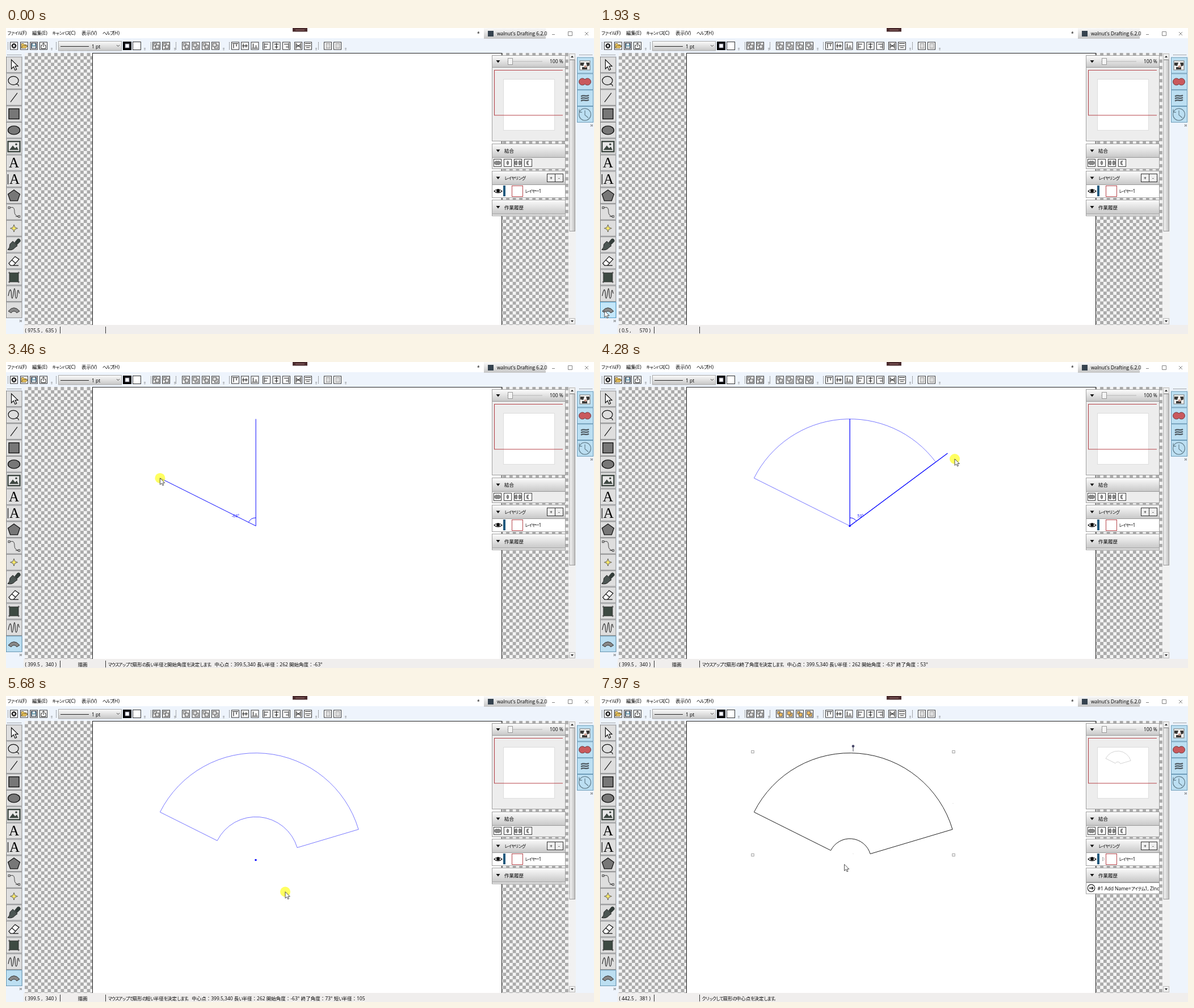
Animation of 1036 by 540 pixels, one loop 8000 ms. Source, as an HTML page:

```html
<!DOCTYPE html>
<html lang="ja">
<head>
<meta charset="utf-8">
<title>Fan tool</title>
<style>
html, body { margin: 0; width: 100%; height: 100%; overflow: hidden; background: #fff; }
svg { display: block; }
text { font-family: "Open Sans", "Noto Sans", "Noto Sans CJK JP", "Noto Sans CJK", sans-serif; font-size: 8.5px; white-space: pre; }
.kana { font-size: 7.6px; letter-spacing: -1.4px; }
.serif { font-family: "Liberation Serif", "Noto Serif", serif; font-size: 25px; }
</style>
</head>
<body>
<svg id="stage" width="1036" height="540" viewBox="0 0 1036 540"></svg>
<script>
const LOOP = 8000;
const UNIT = 0.7214;               // screen pixels per canvas unit
const C = { x: 440.2, y: 289.3 };  // centre of the fan
const R = 188.7, A0 = -63.43, A1 = 73.4;

// ---- drawing helpers ----
const rect = (x, y, w, h, fill, stroke = 'none', more = '') =>
  `<rect x="${x}" y="${y}" width="${w}" height="${h}" fill="${fill}" stroke="${stroke}" ${more}/>`;
const path = (d, stroke = '#222', w = 1, fill = 'none', more = '') =>
  `<path d="${d}" stroke="${stroke}" stroke-width="${w}" fill="${fill}" ${more}/>`;
const oval = (x, y, rx, ry, fill, stroke = 'none', w = 1, more = '') =>
  `<ellipse cx="${x}" cy="${y}" rx="${rx}" ry="${ry}" fill="${fill}" stroke="${stroke}" stroke-width="${w}" ${more}/>`;
const at = (x, y, inner) => `<g transform="translate(${x} ${y})">${inner}</g>`;
const text = (x, y, s, more = '') => `<text x="${x}" y="${y}" ${more}>` +
  s.replace(/[\u3001-\u30ff]+/g, k => `<tspan class="kana">${k}</tspan>`) + '</text>';
const dots = (x, y, n, dx, dy) => Array.from({ length: n }, (_, i) =>
  rect(x + i * dx, y + i * dy, 1, 1, '#555')).join('');
const polar = (r, a) => {
  const k = a * Math.PI / 180;
  return [C.x + r * Math.sin(k), C.y - r * Math.cos(k)];
};
const pt = p => p.map(v => v.toFixed(2)).join(' ');
const arc = (r, to, sweep) => `A${r} ${r} 0 0 ${sweep} ${pt(to)}`;

// Ring sector between two angles; r = 0 gives a pie slice.
function fan(r, a) {
  const sweep = a > A0 ? 1 : 0;
  const inner = r > 0 ? `L${pt(polar(r, a))}${arc(r, polar(r, A0), 1 - sweep)}` : `L${C.x} ${C.y}`;
  return `M${pt(polar(R, A0))}${arc(R, polar(R, a), sweep)}${inner}Z`;
}

// ---- static parts ----
const defs = `<defs>
  <linearGradient id="head" x2="0" y2="1"><stop stop-color="#fbfbfb"/><stop offset="1" stop-color="#c6c6c6"/></linearGradient>
  <linearGradient id="bar"><stop stop-color="#fafafa"/><stop offset="1" stop-color="#bdbdbd"/></linearGradient>
  <pattern id="check" width="11.54" height="11.54" x="33" y="44" patternUnits="userSpaceOnUse">
    <rect width="11.54" height="11.54" fill="#aaa"/>
    <path d="M0 0h5.77v11.54h5.77v-5.77h-11.54z" fill="#f4f4f4"/></pattern></defs>`;

const toolIcons = [
  path('M-4.500-9V7L-.7 3.300 2 9.500 4.700 8.300 2 2.300H7Z', '#111', 1.2, '#fff'),
  oval(-1, -1, 9, 7.5, 'none', '#111', 1.2) + path('M3 5Q9 5 8 9', '#111', 1.2),
  path('M-6 8L6-8', '#111', 1.1),
  rect(-9, -9, 18, 18, '#777', '#111', 'stroke-width="1.4"'),
  oval(0, 0, 10.5, 7.5, '#777', '#111', 1.4),
  rect(-10.5, -9, 21, 18, '#e8e8e8', '#3c4640', 'stroke-width="2.4"') +
    path('M-8 6L-2-2 2 3 5 0 8 6Z', 'none', 0, '#3c4640') + oval(4, -4, 1.8, 1.8, '#3c4640'),
  '<text class="serif" text-anchor="middle" y="8">A</text>',
  path('M-10.500-9V9', '#111', 1.2) + '<text class="serif" text-anchor="middle" x="1" y="8">A</text>',
  path('M0-10L10.500-2.500 6.500 9H-6.500L-10.500-2.500Z', '#111', 1.2, '#777'),
  path('M-9-8H-2Q1-7 1 0T9 8H3', '#333', .9) + rect(-10, -9, 3, 3, '#fff', '#333') + rect(7.5, 6.5, 3, 3, '#fff', '#333'),
  path('M0-6.500L1.700-1.700 6.500 0 1.700 1.700 0 6.500-1.700 1.700-6.500 0-1.700-1.700Z', '#555', .9, '#ffec6a'),
  path('M1-4L6-10Q9-12 11-9T10-4L5 1Z', 'none', 0, '#333d3a') + path('M-2-6L6 2 2 5Q-3 11-11 9-7 6-7-1Z', '#222', 1, '#4c5653'),
  path('M-9 4L2-8 9-3-1 8H-6ZM-4-2L3 4M-6 8H8', '#111', 1.2, '#fff'),
  rect(-8, -8, 16, 16, '#3d4a42') + path('M-10-8H10M-10 8H10M-8-10V10M8-10V10', '#222', .8),
  path('M-10 4C-8-7-6-10-5-4S-5 8-3 8-1-9 1-9 1 8 4 8 5-5 7-6 8 0 10-1', '#222', 1.1),
  path('M-10 2Q0-10 10 2L5 5Q0-1-5 5Z', '#333', 1, '#888')
];
const toolY = i => 65 + i * 28.85;
const tool = (i, fill = '#dedede', edge = '#8a8a8a') =>
  rect(.5, toolY(i) - 13.9, 27.5, 27.5, fill, edge) + at(14, toolY(i), toolIcons[i]);

const cell = (x, inner = '') => at(x, 31.5, rect(-6.5, -6.5, 13, 13, '#fff', '#333') + inner);
const stack = c => rect(-4.5, -4.5, 5, 5, c, '#666') + rect(-1.5, -1.5, 6, 6, c, '#444');
const arrange = c => [317, 334.5, 352, 369].map((x, i) =>
  cell(x, i % 2 ? rect(-1.5, -1.5, 6, 6, c, '#555') + rect(-4.5, -4.5, 6, 6, c, '#555') : stack(c))).join('');
const more = x => path(`M${x} 36h3M${x + .5} 38l1 1 1-1`, '#555', .8);

function topBar() {
  const aligns = ['M-5-4H5M-3-3V4M2-3V1', 'M-5 0H5M-3-4V4M2-3V3', 'M-5 4H5M-3 3V-4M2 3V-1',
    'M-4-5V5M-3-3H3M-3 2H1', 'M0-5V5M-4-3H4M-3 2H3', 'M4-5V5M3-3H-4M3 2H-1',
    'M-4-5V5M4-5V5M-3-2L3 2M-3 2L3-2', 'M-5-4H5M-5 0H5M-3 3H3'];
  let s = rect(0, 18, 1036, 26, '#eef4fc') + rect(842, 0, 109, 19, 'url(#head)');
  s += ['ファイル(F)', '編集(E)', 'キャンバス(C)', '表示(V)', 'ヘルプ(H)']
    .map((m, i) => text([2, 46, 81, 133, 170][i], 11.5, m)).join('');
  s += text(865, 13, "walnut's Drafting 6.2.0") + rect(849, 5, 10, 10, '#36434f') + text(830, 13, '*');
  s += rect(505, 0, 26, 6.5, '#4a2b2d') + path('M510 3.500H526', '#a07474', 1);
  s += path('M962 11.500H967M990.500 6.500H997.500V13.500H990.500ZM1020 7L1026 13M1026 7L1020 13', '#777', .9);
  s += [3, 88, 255, 299, 393, 550].map(x => dots(x, 25, 7, 0, 2)).join('');
  s += [79, 243, 296, 382, 545, 597].map(more).join('');
  s += cell(14, oval(0, 0, 3.2, 3.2, 'none', '#222', 2) + path('M-5 0H5M0-5V5M-3.500-3.500L3.500 3.500M3.500-3.500L-3.500 3.500', '#222', .9) + oval(0, 0, 1.5, 1.5, '#fff'));
  s += cell(32, path('M-5 4V-4H-1L0-2H4V0M-5 4L-3 0H6L3 4Z', '#5b4a20', .8, '#f0ca62'));
  s += cell(49, rect(-4.5, -4.5, 9, 9, '#6b98ab', '#223') + rect(-2, -4, 4, 3, '#fff') + rect(-3, 1, 6, 3, '#e8e8e8'));
  s += cell(66, path('M-2-1H-4V5H4V-1H2M0 2V-5M-2.500-2.500L0-5 2.500-2.500'));
  s += rect(92.5, 23.5, 111, 16.5, 'url(#head)', '#aaa') + path('M96 32.500H146', '#222', 1) + text(151, 35.500, '1 pt') +
    path('M195 30l2.500 2.500 2.500-2.500', '#444');
  s += rect(206, 24, 15, 15, '#000') + rect(210, 28, 7, 7, '#fff', '#778') + rect(223.5, 24.5, 14, 14, '#fff', '#333');
  s += [265, 282].map(x => cell(x, stack('#ddd') + path('M-5-5H5V5H-5Z', '#777', .8, 'none', 'stroke-dasharray="2 1"'))).join('');
  s += [404, 421, 438.5, 459, 476.5, 494, 515, 532].map((x, i) => cell(x, path(aligns[i], '#222', 1.2))).join('');
  s += [567, 584].map(x => cell(x, rect(-3, -4, 7, 8, '#ddd', '#999'))).join('');
  return s;
}

function sideBar() {
  const icons = [
    rect(-9, -8, 18, 16, '#f6f6f4', '#777') + path('M-8-5H-1L-3 1-8 0ZM2-5H8V0L4 2ZM-5 3H4V7H-5Z', 'none', 0, '#393836') + oval(1, 2, 2.5, 2, '#c99a8c'),
    path('M0-4A6 6 0 1 0 0 4A6 6 0 1 0 0-4Z', '#713a3f', 1, '#c9595d'),
    [-4, 0, 4].map(y => path(`M-7 ${y + 1}Q-4 ${y - .8} 0 ${y}T7 ${y - 1}`, '#4e5960', 2.2)).join(''),
    oval(0, 0, 10.5, 10.5, 'none', '#65808f', 1.2) + path('M0-7V1L6 6M-10-4V-9M-10-4H-5', '#65808f', 1.2)
  ];
  return rect(1004, 44, 32, 480, '#eef4fc') + dots(1010, 47, 12, 2, 0) +
    icons.map((g, i) => rect(1006.5, 52 + i * 28.85, 28, 27.8, '#bcdff2', '#6d9cb8') + at(1020, 66 + i * 28.85, g)).join('') +
    path('M1030 170l1.500 2-1.500 2M1033 170V174', '#444', .8);
}

const panel = (y, h, head, label) => rect(856.5, y + .5, 129, h, '#ededed', '#a0a0a0') +
  rect(857, y + 1, 128, head, 'url(#head)') + path(`M857 ${y + head + .5}H985`, '#999') +
  path(`M863.500 ${y + head / 2 - 1.5}h7l-3.500 4.500z`, 'none', 0, '#111') + text(878, y + head / 2 + 4.2, label);

function panels() {
  const union = ['M0-3A3.500 3.500 0 1 0 0 3A3.500 3.500 0 1 0 0-3Z', 'M0-4Q4 0 0 4Q-4 0 0-4Z',
    'M-2-4A4 4 0 0 0-2 4Q0 0-2-4ZM2-4A4 4 0 0 1 2 4Q0 0 2-4Z', 'M1-4A4 4 0 0 0 1 4Q-2 0 1-4Z'];
  let s = panel(48, 151, 21, '') + path('M883 59H945', '#c4c4c4', 1.5) + rect(884.5, 53.5, 8, 11, '#f4f4f4', '#999') +
    text(958, 62, '100 %') + rect(876.5, 90.5, 90, 90, '#fff', '#ddd') +
    path('M981 74.500H860.500V154H981', '#b5444a', 1.1);
  s += panel(204, 44, 24, '結合') + union.map((d, i) =>
    at(866 + i * 18, 238, rect(-6.5, -6.5, 13, 13, '#fff', '#444') + path(d, '#666', .7, '#888'))).join('');
  s += panel(252, 47, 24, 'レイヤリング') + rect(857, 277, 128, 22, '#fff') + rect(953.5, 257.5, 14, 14, '#eee', '#333') +
    rect(967.5, 257.5, 14, 14, '#eee', '#333') + text(958, 267.5, '+') + text(973, 267.5, '-');
  s += path('M860 288Q867 281 874 288Q867 294 860 288Z', '#111', 1.1, '#fff') + oval(867, 287.5, 3, 3, '#111') +
    rect(876, 278, 4, 19, '#215a7e') + rect(891.5, 278.5, 19, 19, '#fff', '#b5444a') + text(914, 291, 'レイヤー1');
  return s + panel(303, 28, 25, '作業履歴');
}

function scene() {
  let s = defs + rect(0, 0, 1036, 540, '#fff') + topBar();
  s += rect(0, 44, 33, 496, '#eef4fc') + dots(2, 47, 13, 2, 0) + toolIcons.map((_, i) => tool(i)).join('') +
    path('M24 515l1.500 2-1.500 2M27 515V519', '#444', .8);
  s += rect(33, 44, 958, 480, 'url(#check)') + rect(152.5, 44.5, 721, 500, '#fff', '#222');
  s += rect(991, 44, 13, 480, '#f1f1f1') + rect(992.5, 45.5, 10, 10, '#eee', '#bbb') + rect(992.5, 512.5, 10, 10, '#eee', '#bbb') +
    rect(993, 56.5, 9.5, 302, 'url(#bar)', '#999') + path('M995 52L997.500 49 1000 52ZM995 516L997.500 519 1000 516Z', 'none', 0, '#222');
  s += rect(31, 524, 1005, 16, '#f0eeed') + path('M95.500 527V539M175.500 527V539', '#333');
  return s + sideBar() + '<g id="art"></g>' + panels() + '<g id="live"></g>';
}

// ---- motion ----
// bursts of change: start, end, number of steps
const bursts = [[0, 0, 1], [420, 490, 2], [690, 1450, 11], [1520, 2290, 11], [2360, 2910, 9], [3110, 3460, 6], [3660, 3660, 1],
  [3860, 4630, 12], [4780, 5540, 12], [5610, 6380, 12], [6450, 7220, 12], [7290, 7630, 5], [7830, 7970, 3]];

function tick(t) {
  const [from, to, n] = bursts.filter(b => b[0] <= t).pop();
  if (t >= to) return to;
  const d = (to - from) / (n - 1);
  return from + Math.floor((t - from) / d + 1e-6) * d;
}

// pointer: time, x, y
const trail = [[0, 930, 560], [419, 930, 560], [420, 929, 539], [490, 927, 537], [690, 918, 532], [1000, 640, 490],
  [1300, 152.4, 455.2], [1400, 50, 458], [1450, 24, 464], [1830, 8, 499], [2059, 8, 499], [2290, 176, 472], [2360, 188, 469],
  [2700, 400, 310], [2840, C.x, C.y], [3040, C.x, C.y], [3390, 271.4, 204.9], [3800, 271.4, 204.9], [3990, 380, 163],
  [4100, 512, 148], [4210, 612.5, 161], [4280, 625, 171], [4420, 642, 190], [4560, 655.8, 225], [4780, 655.8, 225],
  [4990, 640, 243], [5200, 590, 275], [5330, 545, 302], [5470, 510, 338], [5610, 494, 343], [5680, 492, 345.5],
  [6000, 480, 352], [6310, 484, 342], [6660, 459.6, 313], [6730, 459.3, 315], [7000, 464.2, 318], [7290, 465, 319],
  [7450, 475, 322], [7630, 489, 335], [7830, 486, 330], [7900, 471.2, 318.9], [7970, 430.5, 297]];

function pointer(time) {
  const t = Math.max(0, time);
  const i = trail.findIndex(k => k[0] > t);
  if (i < 0) return trail[trail.length - 1].slice(1);
  const a = trail[i - 1], b = trail[i], f = (t - a[0]) / (b[0] - a[0]);
  return [a[1] + (b[1] - a[1]) * f, a[2] + (b[2] - a[2]) * f];
}

const PICK = 2059, DRAG1 = 3110, UP1 = 3660, DRAG2 = 3930, UP2 = 4780, DRAG3 = 4990, DONE = 7290;
const holds = [[PICK, 2130], [2910, UP1], [DRAG2, UP2], [DRAG3, DONE]];
const units = v => Math.round(v / UNIT);

// Pointer place in canvas units, as the status bar reports it.
function place(q) {
  if (q < 820) return [975.5, 635];
  const c = q < 2250 ? Math.min(q - 70, 1300) : q < DONE ? Math.min(q, 2910) : q - 70;
  const [x, y] = pointer(c);
  return [Math.round((x - 152) / UNIT * 2) / 2, units(y - 44)];
}

function angleMark(a, w) {
  const r = 14.4;
  return path(`M${pt(polar(r, 0))}${arc(r, polar(r, a), a > 0 ? 1 : 0)}`, '#00f', w) +
    text(453 + (a - 53) * .474, 273.5, Math.round(a) + '°', 'fill="#00f" style="font-size:7px"');
}

// Returns the drawing on the page and the status message.
function draft(q) {
  const [x, y] = pointer(q - 70), dx = x - C.x, dy = C.y - y;
  const dist = Math.hypot(dx, dy), angle = Math.atan2(dx, dy) * 180 / Math.PI;
  const ask = s => `クリックして扇形の${s}を決定します。`;
  const info = (s, n, rest) => `マウスアップで扇形の${s}を決定します。 中心点：399.5,340 長い半径：${n} 開始角度：${rest}`;
  const thin = d => path(d, '#00f', .72, 'none', 'opacity=".75"');
  const dot = rect(C.x - 1.7, C.y - 1.4, 3, 3, '#00f');
  const up = len => `M${C.x} ${C.y}V${C.y - len}`;
  if (q < PICK) return ['', ''];
  if (q < DRAG1) return ['', ask('中心点')];
  if (q < UP1) return [path(up(dist) + `M${C.x} ${C.y}L${x} ${y}`, '#00f', .95) + angleMark(angle, .9),
    info('長い半径と開始角度', units(dist), Math.round(angle) + '°')];
  if (q < DRAG2) return [thin(`M${C.x} ${C.y}L${pt(polar(R, A0))}`) + dot, ask('終了角度')];
  if (q < UP2) return [thin(fan(0, angle)) + path(up(R) + `M${C.x} ${C.y}L${x} ${y}`, '#00f', 1.2) + angleMark(angle, 1) + dot,
    info('終了角度', 262, `-63° 終了角度：${Math.round(angle)}°`)];
  if (q < DRAG3) return [thin(fan(0, A1)) + dot, ask('短い半径')];
  if (q < DONE) return [thin(fan(dist, A1)) + dot,
    info('短い半径', 262, `-63° 終了角度：73° 短い半径：${units(dist)}`)];
  const grips = [[269, 98.5], [623, 98.5], [269, 280.5], [623, 280.5]]
    .map(([gx, gy]) => rect(gx - 2.2, gy - 2.2, 4.4, 4.4, '#fff', '#888', 'stroke-width=".8"')).join('');
  return [path(fan(37.5, A1), '#111', .95) + grips + path('M446 88V98', '#445', 1) + oval(446, 88.5, 2.3, 2.3, '#446') +
    rect(445.5, 278, 1, 1, '#ccc') + rect(621.5, 189, 1, 1, '#ccc'), ask('中心点')];
}

const finished = () => arrange('#f2bd62') +
  `<g transform="translate(876 90) scale(.126) translate(-152 -44)">${path(fan(37.5, A1), '#bbb', 5)}</g>` +
  path('M885.500 284.500V291L889 287.700Z', '#999', .8) +
  rect(856.5, 329.5, 129, 19.5, '#fff', '#a0a0a0') + oval(865.5, 339, 6.3, 6.3, '#fff', '#222', 1.2) +
  path('M862 339H869M866.500 336.500L869 339 866.500 341.500', '#222', 1.3) +
  `<svg x="876" y="330" width="109" height="18">${text(.5, 12.5, '#1 Add Name=アイテム1, ZIndex')}</svg>`;

function live(q, message) {
  const [x, y] = pointer(q), [cx, cy] = place(q);
  const pressed = holds.some(([a, b]) => q >= a && q < b);
  const drawing = (q >= DRAG1 && q < UP1) || (q >= DRAG2 && q < UP2) || (q >= DRAG3 && q < DONE);
  let s = q < DONE ? arrange('#ddd') : finished();
  if (q >= PICK) s += tool(15, '#bcdff2', '#6d9cb8');
  else if (x < 28 && y > 484 && y < 512) s += tool(15, '#c4e7fa', '#4f9fce');
  s += text(33.5, 536.5, `( ${cx} ,`) + text(89, 536.5, `${cy} )`, 'text-anchor="end"');
  if (drawing) s += text(126.5, 536.5, '描画');
  s += text(179.5, 536.5, message);
  if (pressed) s += oval(x, y, 9, 9, '#ff0', 'none', 0, 'opacity=".62"');
  return s + at(x, y, path('M0 0V11.500L2.700 9 4.600 13 6.500 12.200 4.700 8.400H8.300Z', '#222', .8, '#fff'));
}

// ---- run ----
const find = id => document.getElementById(id);
find('stage').innerHTML = scene();
const art = find('art'), overlay = find('live');
const begin = performance.now();
let shown = -1;

function frame() {
  const q = tick(Math.max(0, performance.now() - begin) % LOOP);
  if (q !== shown) {
    shown = q;
    const [drawing, message] = draft(q);
    art.innerHTML = drawing;
    overlay.innerHTML = live(q, message);
  }
  requestAnimationFrame(frame);
}
frame();
</script>
</body>
</html>
```
